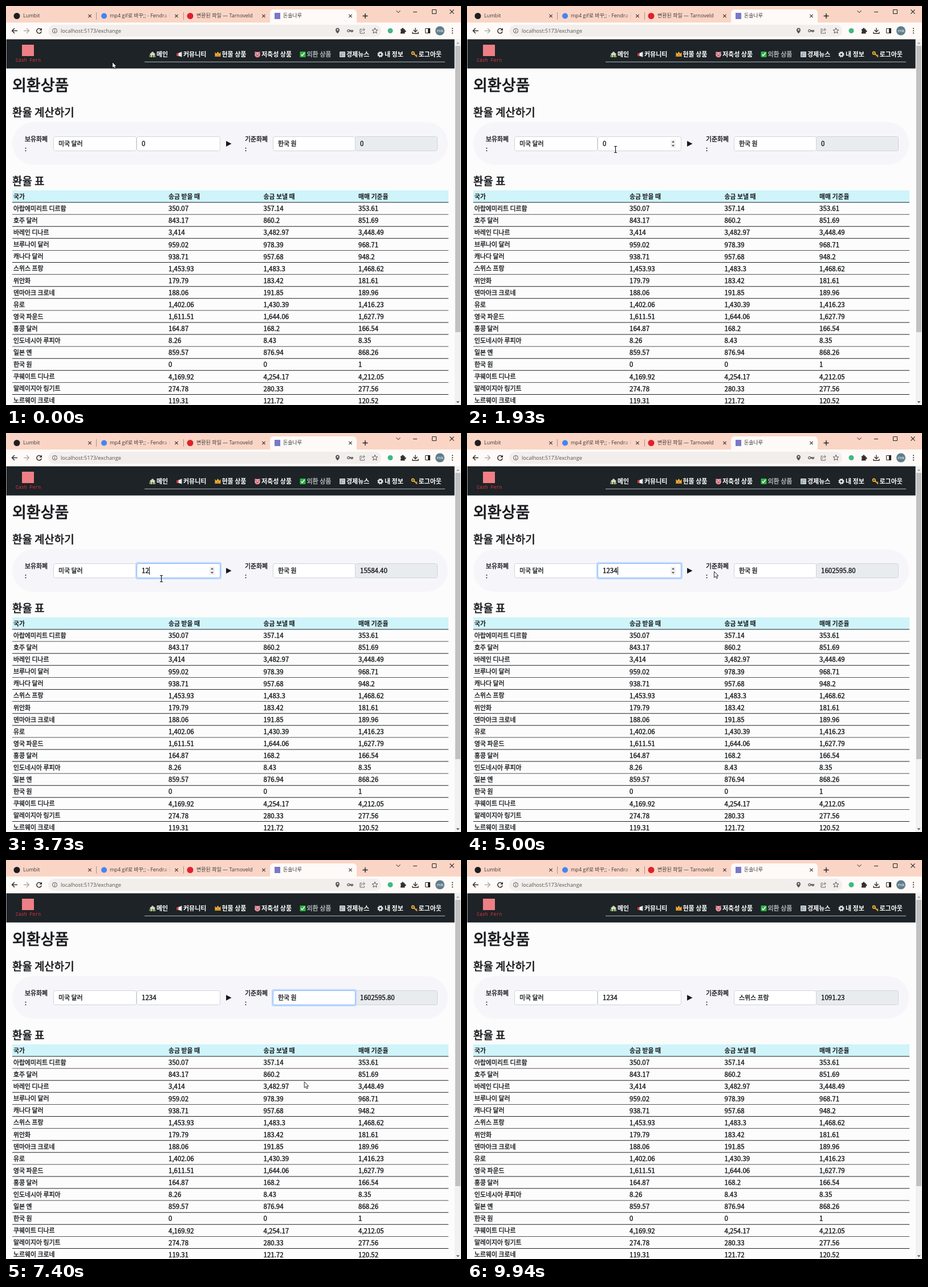
Write an HTML page with a canvas that moves like this. It is 798x701 px and loops after 9970 ms.

```html
<!DOCTYPE html>
<html lang="ko">
<head>
<meta charset="utf-8">
<style>
  html, body { margin: 0; width: 100%; height: 100%; overflow: hidden; background: #fcfcfc; }
  canvas { display: block; }
</style>
</head>
<body>
<canvas id="stage" width="798" height="701"></canvas>
<script>
const ctx = document.getElementById('stage').getContext('2d');
const LOOP = 9970, USD = 1298.7, CHF = 1468.62;
const PAGE = '"Noto Sans CJK KR", "Noto Sans CJK", sans-serif';
const CHROME = '"Open Sans", "Noto Sans CJK KR", "Noto Sans CJK", sans-serif';
const MONO = '"Liberation Mono", monospace';
const INK = '#17191c';

const rows = `아랍에미리트 디르함|350.07|357.14|353.61
호주 달러|843.17|860.2|851.69
바레인 디나르|3,414|3,482.97|3,448.49
브루나이 달러|959.02|978.39|968.71
캐나다 달러|938.71|957.68|948.2
스위스 프랑|1,453.93|1,483.3|1,468.62
위안화|179.79|183.42|181.61
덴마아크 크로네|188.06|191.85|189.96
유로|1,402.06|1,430.39|1,416.23
영국 파운드|1,611.51|1,644.06|1,627.79
홍콩 달러|164.87|168.2|166.54
인도네시아 루피아|8.26|8.43|8.35
일본 옌|859.57|876.94|868.26
한국 원|0|0|1
쿠웨이트 디나르|4,169.92|4,254.17|4,212.05
말레이지아 링기트|274.78|280.33|277.56
노르웨이 크로네|119.31|121.72|120.52`.split('\n').map(r => r.split('|'));

// Pointer waypoints: time, x, y
const route = [
  [0, 186, 98], [500, 186, 98], [1750, 260, 252], [2200, 260, 252], [2700, 272, 256],
  [4500, 272, 256], [5000, 433, 243], [5500, 505, 242], [6400, 535, 341], [6800, 535, 341],
  [7500, 522, 392], [7800, 522, 392], [8300, 491, 234], [8600, 491, 234], [9100, 560, 292]
];
const typing = [[0, '0'], [2900, ''], [3350, '1'], [3650, '12'], [4150, '123'], [4550, '1234']];
const FOCUS_INPUT = 2250, FOCUS_SELECT = 5500, PICK = 7700, BLUR = 9150, POINTER_OFF = 9400;

function rect(x, y, w, h, fill, radius = 0, stroke) {
  ctx.beginPath();
  ctx.roundRect(x, y, w, h, radius);
  if (fill) { ctx.fillStyle = fill; ctx.fill(); }
  if (stroke) { ctx.strokeStyle = stroke; ctx.lineWidth = 1; ctx.stroke(); }
}

function circle(x, y, r, fill) { rect(x - r, y - r, 2 * r, 2 * r, fill, r); }

// Path drawn around a local origin
function shape(x, y, d, fill, stroke, width = 1.2) {
  const path = new Path2D(d);
  ctx.save();
  ctx.translate(x, y);
  if (fill) { ctx.fillStyle = fill; ctx.fill(path); }
  if (stroke) { ctx.strokeStyle = stroke; ctx.lineWidth = width; ctx.stroke(path); }
  ctx.restore();
}

// Text placed by its left edge and vertical centre; medium weight is a regular face with a thin outline
function text(s, x, y, size, { weight = 500, color = INK, font = PAGE } = {}) {
  const medium = weight === 500, baseline = y + size * 0.37;
  ctx.font = `${medium ? 400 : weight} ${size}px ${font}`;
  ctx.fillStyle = ctx.strokeStyle = color;
  ctx.fillText(s, x, baseline);
  if (medium) {
    ctx.lineWidth = size * 0.034;
    ctx.lineJoin = 'round';
    ctx.strokeText(s, x, baseline);
  }
  return ctx.measureText(s).width;
}

const body = (s, x, y, opts) => text(s, x, y, /\d/.test(s) ? 11.5 : 10.9, opts);
const label = (s, x, y, color = '#3c3a39', size = 9) => text(s, x, y, size, { weight: 400, color, font: CHROME });
const cross = (x, y, r, color = '#333') => shape(x, y, `M${-r} ${-r}L${r} ${r}M${r} ${-r}L${-r} ${r}`, null, color, 1.1);

function drawTabs() {
  rect(0, 0, 798, 40, '#fad5c5');
  rect(463, 6, 152, 30, '#fefaf7', 6);
  rect(0, 29, 798, 29, '#fefaf7');
  circle(19, 17.5, 5.5, '#1d1d20');
  label('Lumbit', 30, 17);
  circle(172, 17.5, 5, '#4285f4');
  label('mp4 gif로 바꾸;; - Fendra 검', 182, 17);
  const fade = ctx.createLinearGradient(274, 0, 289, 0);
  fade.addColorStop(0, '#fad5c500');
  fade.addColorStop(1, '#fad5c5');
  rect(274, 8, 22, 19, fade);
  circle(323, 17.5, 5.5, '#e0202c');
  label('변환된 파일 — Tarnoveld', 334, 17);
  rect(471, 12, 10, 11, '#7779c9');
  label('돈솔나루', 486, 17);
  for (const x of [147, 299, 452, 604]) cross(x, 17.5, 2.7);
  for (const x of [158, 311]) rect(x, 11, 1, 13, '#a78f86');
  shape(630, 17.5, 'M-4.5 0H4.5M0 -4.5V4.5', null, '#222', 1.4);
  shape(688, 10, 'M-3.5 -2L0 1.8L3.5 -2', null, '#222', 1);
  shape(717, 11, 'M-3 -.5H4', null, '#222', 1);
  rect(747.5, 6.5, 7, 7, null, 0, '#222');
  cross(782, 10, 3.6, '#222');
}

function drawToolbar() {
  shape(15, 43.5, 'M5 0H-4M0 -4.5L-4.5 0L0 4.5', null, '#333', 1.5);
  shape(36, 43.5, 'M-5 0H4M0 -4.5L4.5 0L0 4.5', null, '#aaa', 1.4);
  shape(58, 43.5, 'M3.4 -2.3A4.2 4.2 0 1 0 4.2 1', null, '#333', 1.5);
  shape(58, 43.5, 'M5 -5V-.5H.5Z', '#333');
  rect(74, 33, 584, 21, '#f2eeec', 10.5);
  rect(81.5, 39.5, 8, 8, null, 4, '#555');
  shape(85.5, 43.5, 'M0 -.7V2.5M0 -2.7V-1.6', null, '#555', 1);
  label('localhost:5173/exchange', 96, 43.5, '#55504e', 9.2);

  shape(581.5, 43.5, 'M0 5C-6 -1 -3 -5 0 -5S6 -1 0 5ZM0 -3A1.4 1.4 0 1 0 .1 -3Z', '#555');
  shape(603.5, 43.5, 'M-1 -.7A2 2 0 1 0 -1 .7H2V2H4V.7H5V-.7Z', null, '#555', 1.2);
  shape(625, 43.5, 'M-1 -3H-4V4.5H3.5V2M-2 2C-2 -1 0 -2 3 -2M1.5 -4.5L4.5 -2L1.5 .5', null, '#666', 1);
  shape(647, 43.5, 'M0 -5L1.4 -1.6L5 -1.4L2.2 .9L3.1 4.4L0 2.4L-3.1 4.4L-2.2 .9L-5 -1.4L-1.4 -1.6Z', null, '#555', 1);
  circle(674, 43.5, 4.5, '#41b883');
  shape(696, 43.5, 'M-4 -3H-1.6A1.5 1.5 0 1 1 1.2 -3H3.5V-.5A1.5 1.5 0 1 1 3.5 2.2V5H-4V2A1.4 1.4 0 0 0 -4 -.5Z', '#303030');
  shape(718, 43.5, 'M0 -5V2M-3.5 -1.5L0 2L3.5 -1.5M-5 2V4.8H5V2', null, '#333', 1.4);
  rect(735.5, 39.5, 8, 8, null, 0.5, '#222');
  rect(740, 39, 4, 9, '#222');
  circle(761, 43.5, 8, '#607d8b');
  text('mk', 755.5, 43, 8, { weight: 400, color: '#fff', font: CHROME });
  for (const y of [39.5, 43.5, 47.5]) circle(783, y, 1.1, '#333');
}

const icons = {
  house: x => {
    shape(x, 85, 'M-3.8 0H3.8V5H-3.8Z', '#e9e5d5');
    shape(x, 85, 'M-5.5 0L0 -5L5.5 0Z', '#d8d0c2');
    shape(x, 85, 'M-1 1H1.5V5H-1Z', '#9a5b34');
    circle(x - 4, 88, 2, '#4caf50');
    circle(x + 4, 88.5, 1.7, '#4caf50');
  },
  horn: x => {
    shape(x, 85, 'M-5 -1L3 -4V4L-5 2Z', '#f1efef');
    shape(x, 85, 'M-5 -1.5L-1.5 -2.5V2.8L-5 2Z', '#d9382f');
    shape(x, 85, 'M3 -4.5H4.6V4.5H3Z', '#c9ced0');
  },
  crown: x => {
    shape(x, 85, 'M-5 -4L-2.5 -1L0 -5L2.5 -1L5 -4V4H-5Z', '#f5b334');
    rect(x - 5, 87, 10, 1.5, '#c9802b');
    circle(x, 85.5, 1.1, '#c44');
  },
  pig: x => {
    shape(x, 85, 'M-5 -5L-1 -4L1 -4L5 -5L4 0H-4Z', '#d9707e');
    circle(x, 85.5, 4.8, '#f2a3ab');
    rect(x - 2.4, 85.5, 4.8, 3.2, '#d35f70', 1.6);
    circle(x - 2.3, 84, 0.8, '#333');
    circle(x + 2.3, 84, 0.8, '#333');
  },
  check: x => {
    rect(x - 5, 80, 10, 10, '#2fb344', 1);
    shape(x, 85, 'M-3 0L-1 2.5L3.2 -3', null, '#e8ffe8', 1.5);
  },
  news: x => {
    rect(x - 5, 80, 10, 10, '#cfd6da', 1);
    rect(x - 3.5, 82, 7, 1, '#71808a');
    rect(x - 3.5, 84.5, 3, 4, '#8797a1');
    rect(x + 0.5, 84.5, 3, 1, '#8797a1');
    rect(x + 0.5, 87, 3, 1, '#8797a1');
  },
  gear: x => {
    ctx.setLineDash([1.8, 1.5]);
    shape(x, 85, 'M4.2 0A4.2 4.2 0 1 1 -4.2 0A4.2 4.2 0 1 1 4.2 0', null, '#e5e8ea', 2);
    ctx.setLineDash([]);
    shape(x, 85, 'M2.8 0A2.8 2.8 0 1 1 -2.8 0A2.8 2.8 0 1 1 2.8 0', null, '#e5e8ea', 2.2);
  },
  key: x => {
    shape(x, 85, 'M-1 -1L4.5 4.5M2.5 2.5L4.3 .8', null, '#e6a32e', 1.8);
    shape(x, 85, 'M-.5 -2.3A2.2 2.2 0 1 1 -4.9 -2.3A2.2 2.2 0 1 1 -.5 -2.3', null, '#f0b43c', 1.8);
  }
};

const menu = [
  ['house', 257, '메인', 264], ['horn', 304, '커뮤니티', 311], ['crown', 371.5, '현물 상품', 378.5],
  ['pig', 441, '저축성 상품', 448], ['check', 520.5, '외환 상품', 527.5], ['news', 590, '경제뉴스', 597],
  ['gear', 656.5, '내 정보', 664], ['key', 716.5, '로그아웃', 723.5]
];

function drawNav() {
  rect(0.6, 58.4, 786, 51.4, '#1d2327');
  rect(28, 68, 21, 20, '#ee7f85');
  text('Cash Fern', 17, 95, 8.2, { weight: 400, color: '#d8343c', font: MONO });
  for (const [icon, ix, name, x] of menu) {
    icons[icon](ix);
    const active = icon === 'check';
    text(name, x, 85, 11, { weight: active ? 500 : 700, color: active ? '#b4b8ba' : '#fff' });
  }
  rect(243, 97.8, 527, 1, '#b9bdbf');
}

function drawTable() {
  rect(11, 324, 765, 21, '#cff4fa');
  const columns = [13, 285, 451.5, 618];
  ['국가', '송금 받을 때', '송금 보낼 때', '매매 기준율'].forEach((s, i) => text(s, columns[i], 335, 10.9, { weight: 700 }));
  rows.forEach((row, i) => {
    const y = i * 21.09;
    rect(11, 344.6 + y, 765, 0.9, '#1c1e20');
    row.forEach((s, c) => body(s, columns[c], 356 + y));
  });
}

function drawScrollbar() {
  rect(787, 58, 11, 643, '#f1f1f1');
  rect(788, 70, 9, 503, '#c1c1c1');
  shape(792.5, 65, 'M-3 1.5L0 -1.5L3 1.5Z', '#a3a3a3');
  shape(792.5, 696, 'M-3 -1.5L0 1.5L3 -1.5Z', '#505050');
}

function field(x, w, value, focused, fill = '#fff') {
  if (focused) rect(x - 2.2, 226.8, w + 4.4, 30.4, '#c2dbfe', 4);
  rect(x + 0.5, 229.5, w - 1, 25, fill, 3, focused ? '#86b7fe' : '#ced4da');
  return body(value, x + 9, 242);
}

function drawCalculator(t, pointer) {
  rect(11, 204, 764, 75, '#f6f6fa', 37.5);
  body('보유화폐', 33, 234);
  body(':', 33, 250.5);
  body('기준화폐', 419, 234);
  body(':', 419, 250.5);
  shape(390.5, 242, 'M-4.5 -5L5 0L-4.5 5Z', INK);

  const [typedAt, value] = typing.findLast(([at]) => t >= at);
  const picked = t >= PICK;
  const inputFocus = t >= FOCUS_INPUT && t < FOCUS_SELECT;
  const selectFocus = t >= FOCUS_SELECT && t < BLUR;
  const amount = value * USD / (picked ? CHF : 1);

  field(83, 146, '미국 달러');
  field(612, 145, amount ? amount.toFixed(2) : '0', false, '#e9ecef');
  field(468, 145, picked ? '스위스 프랑' : '한국 원', selectFocus);
  const width = field(229, 147, value, inputFocus);

  if (inputFocus && (t - Math.max(typedAt, FOCUS_INPUT)) % 1060 < 530) rect(238 + Math.round(width), 235, 1, 14, '#111');
  if (inputFocus || pointer.overInput) {
    rect(357, 235, 9, 14, '#efefef');
    shape(361.5, 238.5, 'M-2.5 1.2L0 -1.5L2.5 1.2Z', '#444');
    shape(361.5, 245.5, 'M-2.5 -1.2L0 1.5L2.5 -1.2Z', '#444');
  }
}

function pointerAt(t) {
  const next = route.findIndex(p => p[0] > t);
  const b = next < 0 ? route.at(-1) : route[next];
  const a = next < 0 ? b : route[next - 1];
  const p = (t - a[0]) / (b[0] - a[0] || 1);
  const k = a === b ? 0 : p * p * (3 - 2 * p);
  const x = a[1] + (b[1] - a[1]) * k, y = a[2] + (b[2] - a[2]) * k;
  return { x, y, overInput: x > 229 && x < 376 && y > 228 && y < 258 };
}

function drawPointer({ x, y, overInput }) {
  if (overInput) shape(x + 0.5, y, 'M-2.5 -5.5H-.7L0 -5L.7 -5.5H2.5M0 -5V5M-2.5 5.5H-.7L0 5L.7 5.5H2.5', null, '#111', 1.1);
  else shape(x, y, 'M.5 .5V11L3 8.7L4.8 12.5L6.6 11.7L4.9 8H8Z', '#fff', '#111', 0.9);
}

function draw(t) {
  const pointer = pointerAt(t);
  rect(0, 0, 798, 701, '#fcfcfc');
  drawTabs();
  drawToolbar();
  drawNav();
  text('외환상품', 11, 139, 27);
  text('환율 계산하기', 11, 187.5, 18.9);
  text('환율 표', 11, 308, 18.9);
  drawCalculator(t, pointer);
  drawTable();
  drawScrollbar();
  if (t < POINTER_OFF) drawPointer(pointer);
}

const start = performance.now();
function tick() {
  draw((performance.now() - start) % LOOP);
  requestAnimationFrame(tick);
}
tick();
</script>
</body>
</html>
```
